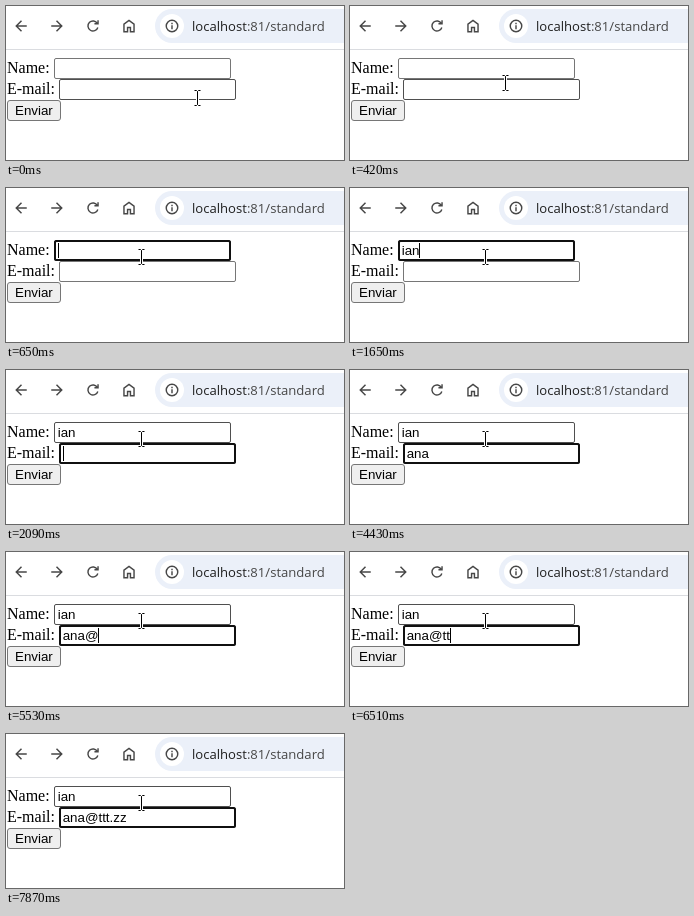
Write an HTML page that moves like this. It is 338 px wide and 154 px high and loops after 8000 ms.

```html
<!DOCTYPE html>
<html lang="es">
<head>
<meta charset="utf-8">
<title>Form</title>
<style>
  html, body { margin: 0; width: 338px; height: 154px; overflow: hidden; background: #fff; }
  svg { display: block; }
  .icon { fill: none; stroke: #474747; stroke-width: 2; }
  .label { font: 16px "Liberation Serif", serif; }
  .ui { font: 13.333px "Liberation Sans", sans-serif; }
  .url { font: 13.1px "Open Sans", sans-serif; fill: #1f1f1f; }
  .path { fill: #474747; }
  .box { fill: #fff; stroke: #767676; }
  .box.hover { stroke: #4f4f4f; }
  .ring { fill: none; stroke: #101010; stroke-width: 2; }
</style>
</head>
<body>
<svg width="338" height="154" viewBox="0 0 338 154">
  <rect x="149" y="3" width="220" height="34" rx="17" fill="#ebf0f9"/>
  <circle cx="166" cy="20" r="12" fill="#fff"/>
  <g class="icon">
    <path id="arrow" transform="translate(15 20) scale(.72)" d="M8 0H-6.6M.7 -7.3L-6.6 0L.7 7.3"/>
    <path transform="translate(51 20) scale(-.72 .72)" d="M8 0H-6.6M.7 -7.3L-6.6 0L.7 7.3"/>
    <path transform="translate(87 20) scale(.72)" d="M6.1 -3.5A7 7 0 1 0 6.7 2M7 -8V-3H2"/>
    <path transform="translate(123 20) scale(.72)" d="M-7 8V-2.5L0 -7.75L7 -2.5V8H2V2H-2V8Z"/>
    <path transform="translate(166 20) scale(.72)" d="M-8 0A8 8 0 1 0 8 0A8 8 0 1 0 -8 0M0 -1V4.5M0 -4.5V-2.5"/>
  </g>
  <text class="url" x="186" y="25">localhost<tspan class="path">:81/standard</tspan></text>
  <path d="M0 43.5H338" stroke="#dadce0"/>

  <text class="label" x="1" y="67">Name:</text>
  <text class="label" x="1" y="88">E-mail:</text>
  <rect class="box" x="48.5" y="52.5" width="176" height="20" rx="1.5"/>
  <rect class="box" x="53.5" y="73.5" width="176" height="20" rx="1.5"/>
  <rect x="1.5" y="94.5" width="53" height="20" rx="2.5" fill="#efefef" stroke="#767676"/>
  <text class="ui" x="9" y="109">Enviar</text>
  <rect class="ring" id="ring" width="175" height="19" rx="1.5"/>
  <text class="ui entry" x="51.7" y="67"></text>
  <text class="ui entry" x="56.7" y="88"></text>
  <rect id="caret" width="1" height="15"/>

  <g id="mouse" fill="none">
    <path d="M-3.5 -7.5h2.5l1 1l1 -1h2.5M0 -6.5V6.5M-3.5 7.5h2.5l1 -1l1 1h2.5" stroke="#fff" stroke-width="3"/>
    <path d="M-3 -7.5h2l1 1l1 -1h2M0 -6.5V6.5M-3 7.5h2l1 -1l1 1h2" stroke="#000"/>
  </g>
</svg>
<script>
const LOOP = 8000, TICK = 110, BLINK = 1000, CARET_ON = 460;
const KEYS = "ian\tana@ttt.zz";
// The click into the first field, then one press per key.
const PRESSES = [650, 1310, 1530, 1650, 2090, 2970, 3090, 3970, 4530, 6510, 6510, 6630, 7090, 7200, 7310];

const $ = id => document.getElementById(id);
const boxes = [...document.querySelectorAll(".box")];
const entries = [...document.querySelectorAll(".entry")];

function place(el, x, y) {
  el.setAttribute("x", x);
  el.setAttribute("y", y);
}

function moveMouse(t) {
  const tick = Math.max(0, Math.floor((t - 100) / TICK) + 1);
  const p = Math.min(tick / 5, 1);
  const ease = p * p * (3 - 2 * p);
  const x = Math.round(191 - 56 * ease);
  const y = Math.round(92 - 23 * ease);
  $("mouse").setAttribute("transform", `translate(${x + 0.5} ${y})`);
  boxes.forEach(box => {
    const top = box.y.baseVal.value;
    box.classList.toggle("hover", y > top && y < top + 20);
  });
}

function drawForm(t) {
  const past = PRESSES.filter(time => time <= t);
  const focused = past.length > 0;
  const texts = KEYS.slice(0, Math.max(0, past.length - 1)).split("\t");
  entries.forEach((entry, i) => entry.textContent = texts[i] || "");

  const active = texts.length - 1;
  const x = boxes[active].x.baseVal.value - 0.5;
  const y = boxes[active].y.baseVal.value - 0.5;
  const width = texts[active] ? entries[active].getComputedTextLength() : 0;
  const caretOn = focused && (t - past.at(-1)) % BLINK < CARET_ON;
  place($("ring"), x + 1, y + 1);
  place($("caret"), Math.floor(x + 4 + width), y + 3);
  $("ring").style.display = focused ? "" : "none";
  $("caret").style.display = caretOn ? "" : "none";
}

function frame() {
  const t = performance.now() % LOOP;
  moveMouse(t);
  drawForm(t);
  requestAnimationFrame(frame);
}
frame();
</script>
</body>
</html>
```
